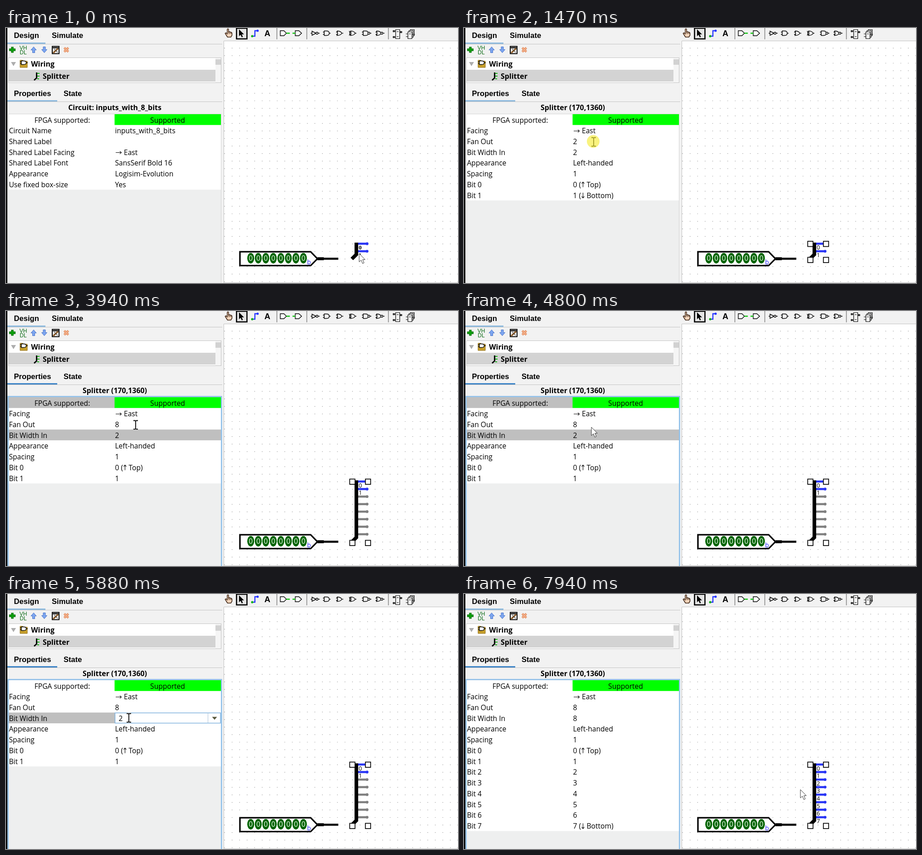
Recreate the animation shown at these times as an HTML page. Size 997 by 562 pixels, loop 8 s.

```html
<!DOCTYPE html>
<html lang="en">
<head>
<meta charset="utf-8">
<title>Splitter properties</title>
<style>
html, body { margin: 0; width: 100%; height: 100%; overflow: hidden; background: #f2f2f2; }
svg { display: block; width: 997px; height: 562px; }
text { font: 15.6px "Open Sans", "Noto Sans", sans-serif; white-space: pre; }
.b { font-weight: 700; font-size: 15.9px; }
.tab { font: bold 16.6px "Liberation Sans", Arial, sans-serif; }
.small { font: 12.5px "Open Sans", "Noto Sans", sans-serif; }
.early { font: bold 13px "Liberation Serif", serif; }
.vhdl { font: 12px "Liberation Sans", Arial, sans-serif; fill: #0a6a14; }
.mid { text-anchor: middle; }
.line { fill: none; stroke: #000; stroke-width: 1.4; }
</style>
</head>
<body>
<svg viewBox="0 0 997 562">
  <rect width="997" height="562" fill="#f2f2f2"/>

  <!-- tabs -->
  <path d="M3 35.5H477M3 162.5H477" stroke="#c4c4c4"/>
  <rect x="3" y="32" width="84" height="3" fill="#8fbbdf"/>
  <text class="tab" x="17.5" y="22">Design</text>
  <text class="tab" x="101" y="22">Simulate</text>
  <text class="tab" x="17.5" y="149.5">Properties</text>
  <text class="tab" x="127" y="149.5">State</text>

  <!-- explorer tools -->
  <path d="M14 41.5V54.5M7 48H21" stroke="#056a05" stroke-width="5.4"/>
  <path d="M14 42.5V53.5M8 48H20" stroke="#0aa30a" stroke-width="3.2"/>
  <text class="vhdl mid" x="38" y="47.5">VH</text>
  <text class="vhdl mid" x="38" y="58">DL</text>
  <g fill="#7da6f0" stroke="#4a74c8">
    <path d="M61 41.5L67 48.5H63.5V54.5H58.5V48.5H55Z"/>
    <path d="M84.5 54.5L90.5 47.5H87V41.5H82V47.5H78.5Z"/>
  </g>
  <rect x="102" y="40.5" width="15" height="16" fill="#fff" stroke="#000" stroke-width="2"/>
  <path d="M102 43.5H117" stroke="#333" stroke-width="3"/>
  <path d="M104 55L115 45" stroke="#8a5a28" stroke-width="3.5"/>
  <path d="M106 46L114 54" stroke="#555" stroke-width="1.5"/>
  <path d="M128.5 43.5L137.5 52.5M137.5 43.5L128.5 52.5" stroke="#df8858" stroke-width="4.6"/>
  <path d="M128.5 43.5L137.5 52.5M137.5 43.5L128.5 52.5" stroke="#f4b08c" stroke-width="2.4"/>

  <!-- explorer tree -->
  <rect x="5.5" y="65.5" width="469" height="55" fill="#fff" stroke="#c4c4c4"/>
  <rect x="6" y="92" width="456" height="26" fill="#d3d3d3"/>
  <rect x="462" y="66" width="12" height="54" fill="#f5f5f5"/>
  <rect x="462" y="69" width="12" height="12" fill="#d2d2d2"/>
  <path d="M11 75H22L16.5 84Z" fill="#adadad"/>
  <path d="M31 71H37L39 73H47V87H31Z" fill="#c8a02c" stroke="#8d6b12"/>
  <path d="M34 72.5H39Q44.5 72.5 44.5 76.500T39 80.5H34ZM31 74.5H34M31 78.5H34M44.5 76.5H48" fill="#fff" stroke="#000" stroke-width="1.3"/>
  <text class="b" x="55.2" y="85">Wiring</text>
  <path d="M67.5 98V110L62 115" fill="none" stroke="#000" stroke-width="3"/>
  <path d="M69 100H74M69 106H74M69 112H73" stroke="#18b418" stroke-width="2"/>
  <text class="b" x="81" y="111.5">Splitter</text>

  <!-- properties -->
  <rect x="5" y="189" width="469" height="373" fill="#eeefef"/>
  <g id="props"></g>

  <!-- canvas -->
  <rect x="480" y="28" width="517" height="534" fill="#fff"/>
  <path id="dots" fill="#7c7c7c"/>
  <path d="M480.5 562V28.5H997M480 561.5H997" fill="none" stroke="#c0c0c0"/>
  <path id="ring" d="M479.5 561V27H997" fill="none" stroke="#99c6ec" stroke-width="3"/>

  <!-- toolbar -->
  <path d="M597.5 0V25M663.5 0V25M843.5 0V25" stroke="#868686" stroke-width="1.6"/>
  <path d="M488 11V3Q489.5 1 491 3V9L493 8L495 9L497 9.5L498.5 11V16L496 20H488.5L483.5 12Q484 10 486 11L488 13Z" fill="#f3d5bb" stroke="#3a2010" stroke-width="1.5"/>
  <path d="M491.5 9V13M494 9.500V13M496.500 10V13" stroke="#3a2010"/>
  <rect x="508.5" y="0.5" width="23" height="23.5" fill="#e4e4e4" stroke="#000" stroke-width="2.6"/>
  <path d="M514 3V18L517.5 15L520 20.5L522.5 19.5L520 14H525Z"/>
  <path d="M543.5 18H549V6H554" fill="none" stroke="#2634ff" stroke-width="2.4"/>
  <circle cx="543" cy="18" r="2.5" fill="#13b313"/><circle cx="555" cy="6" r="2.5" fill="#2634ff"/>
  <text class="tab mid" x="576.5" y="18" style="font-size:18px">A</text>
  <g class="line" id="gates">
    <path d="M605 6H613L618.5 11.5L613 17H605ZM638 6H646L652 11.5L646 17H638Z" fill="#fff"/>
    <path d="M618.5 11.5H626M632 11.5H638" stroke="#13c313" stroke-width="2.4"/>
  </g>
  <g class="line" style="stroke-width:1.2">
    <path d="M859.5 3.5H868.5V23.5H859.5ZM854 7H859M854 20H859M868 9H873M862 8H866M862 19H866"/>
    <path d="M854 5.5H857V8.5H854ZM854 18.5H857V21.5H854ZM870 7.5H873V10.5H870Z"/>
    <path d="M886.5 8.5H895.5V23.5H886.5ZM889 8V5.5H898V20.5H896M892 5V3.5H900.5V17H898M882 13H886M882 19H886M896 14H902M889 13H893"/>
  </g>

  <!-- input pin -->
  <path d="M687 508.5H733" stroke="#000" stroke-width="4.6"/>
  <path d="M687 508.5H701" stroke="#000" stroke-width="6.5"/>
  <path d="M516 493.2H672L687 508.5L672 523.6H516Z" fill="#fff" stroke="#000" stroke-width="3.3"/>
  <g id="bits"></g>
  <text x="664" y="520.5" fill="#3a3aff" style="font:13.5px 'DejaVu Sans',sans-serif">b</text>

  <g id="splitter"></g>
  <rect width="3" height="562"/>
  <path id="arrow" d="M0 0V18.5L4.4 14.6L7.6 22L10.8 20.6L7.7 13.4H13Z" fill="#fff" stroke="#333" stroke-width="1"/>
  <g id="beam" fill="none">
    <path d="M-5 -9.5H-1.5L0 -8.5L1.5 -9.5H5M0 -8.5V8.5M-5 9.5H-1.5L0 8.5L1.5 9.5H5" stroke="#fff" stroke-width="3.4"/>
    <path d="M-5 -9.5H-1.5L0 -8.5L1.5 -9.5H5M0 -8.5V8.5M-5 9.5H-1.5L0 8.5L1.5 9.5H5" stroke="#000" stroke-width="1.8"/>
  </g>
  <circle id="click" r="14" fill="#f6ec3a" opacity=".65"/>
</svg>
<script>
const LOOP = 8000, ROW = 23.75, TOP = 190, GRID = 16.6;
const $ = id => document.getElementById(id);
const within = (t, a, b) => t >= a && t < b;
const rect = (x, y, w, h, fill, extra = '') =>
  `<rect x="${x}" y="${y}" width="${w}" height="${h}" fill="${fill}" ${extra}/>`;
const text = (x, y, s, cls = '', extra = '') =>
  `<text class="${cls}" x="${x}" y="${y}" ${extra}>${s}</text>`;
const range = n => [...Array(n).keys()];

function setup() {
  let d = '';
  for (let y = 43.7; y < 560; y += GRID)
    for (let x = 481.5; x < 997; x += GRID) d += `M${x.toFixed(1)} ${y.toFixed(1)}h1.2v1.2h-1.2z`;
  $('dots').setAttribute('d', d);

  $('bits').innerHTML = range(8).map(i => {
    const x = 539.8 + GRID * i;
    return `<ellipse cx="${x}" cy="507.3" rx="7.6" ry="11.6" fill="#006400"/>` +
      text(x, 513, '0', 'mid', `fill="#d8ecd8" style="font:15px 'DejaVu Sans',sans-serif"`);
  }).join('');

  const and = x => `<path d="M${x} 6.5h5q6 0 6 5t-6 5h-5zM${x - 3} 9h3m-3 5h3"/>`;
  const or = x => `<path d="M${x} 6.5q8 0 11 5q-3 5-11 5q3-5 0-10M${x - 2} 9h4m-4 5h4"/>`;
  const bubble = x => `<circle cx="${x}" cy="11.5" r="2.3" fill="#fff"/>`;
  const lead = x => `<path d="M${x} 11.5h4"/>`;
  $('gates').innerHTML += '<path d="M675 7V16L684 11.5ZM672 11.5H675"/>' + bubble(686) + lead(688) +
    and(702) + lead(712) + or(730) + lead(740) +
    or(759.5) + '<path d="M757 6.5q3 5 0 10"/>' + lead(769) +
    and(788) + bubble(800.5) + lead(802) + or(817) + bubble(829) + lead(831);
}

const CIRCUIT = [['Circuit Name', 'inputs_with_8_bits'], ['Shared Label', ''],
  ['Shared Label Facing', '→ East'], ['Shared Label Font', 'SansSerif Bold 16'],
  ['Appearance', 'Logisim-Evolution'], ['Use fixed box-size', 'Yes']];

function splitterRows(fan, width) {
  const side = i => i === 0 ? ' (↑ Top)' : i === fan - 1 ? ' (↓ Bottom)' : '';
  return [['Facing', '→ East'], ['Fan Out', fan], ['Bit Width In', width],
    ['Appearance', 'Left-handed'], ['Spacing', 1],
    ...range(width).map(i => ['Bit ' + i, i + side(i)])];
}

// Arrow glyphs are drawn so their width stays the same.
function value(y, s) {
  const [, pre, glyph, post] = String(s).match(/^([^→↑↓]*)([→↑↓]?) ?(.*)$/);
  const stroke = d => `<path class="line" style="stroke-width:1.1" d="${d}"/>`;
  if (!glyph) return text(240.5, y, s);
  if (glyph === '→')
    return stroke(`M242 ${y - 5}h12.5m-3.5 -3l3.5 3l-3.5 3`) + text(260, y, post);
  const tip = glyph === '↑' ? `M262.5 ${y}v-11.5m-3 3.5l3 -3.5l3 3.5`
    : `M262.5 ${y - 11.5}v11.5m-3 -3.5l3 3.5l3 -3.5`;
  return text(240.5, y, pre) + stroke(tip) + text(270.5, y, post);
}

function editor(row, s, caret, combo) {
  const y = TOP + ROW * row, x = s ? 256.5 : 248.5;
  return rect(6, y, 234, ROW, '#bfbfbf') + text(6.5, y + 18.3, combo ? 'Bit Width In' : 'Fan Out') +
    rect(240.5, y + .8, 232.5, 22.5, '#fff', 'stroke="#7fb2de" stroke-width="1.5"') +
    text(248.5, y + 18.3, s) +
    (caret ? rect(x - .5, y + 1.5, 1.2, 20.5, '#000') : '') +
    (combo ? rect(445, y + 1, 1, 22, '#a9c3da') + `<path d="M454.5 ${y + 9.5}h11l-5.5 6.5z" fill="#5a5a40"/>` : '');
}

function props(t) {
  const circuit = t < 130, fan = t < 3940 ? 2 : 8, width = t < 6610 ? 2 : 8;
  const rows = circuit ? CIRCUIT : splitterRows(fan, width);
  const focus = t >= 1530 && !within(t, 6610, 6670);
  const marked = within(t, 3940, 5130);
  const labels = rows.map(([k, v], i) => {
    const y = TOP + ROW * (i + 1) + 18.3;
    return text(6.5, y, k) + value(y, v);
  });
  let s = rect(3, 159, 110, 3, focus ? '#3f86c8' : '#8fbbdf') +
    text(240, 181, circuit ? 'Circuit: inputs_with_8_bits' : 'Splitter (170,1360)', 'b mid') +
    '<path d="M5.5 562V189.5H474.5V562" fill="none" stroke="#d4d4d4"/>' +
    rect(6, TOP, 468, ROW * (rows.length + 1), '#fff') +
    (marked ? rect(6, TOP, 234, ROW, '#bfbfbf') + rect(6, TOP + ROW * 3, 468, ROW, '#bfbfbf') : '') +
    rect(239.5, TOP, 234.5, ROW, '#00ff00') +
    text(124, TOP + 18.7, 'FPGA supported:', 'mid') + text(356.5, TOP + 18.7, 'Supported', 'mid') +
    labels.join('');
  if (within(t, 1530, 3940))
    s += editor(2, t < 2880 ? '2' : t < 3670 ? '' : '8', !within(t, 2000, 2470) && !within(t, 3410, 3670));
  if (within(t, 5200, 6610))
    s += editor(3, t < 6020 ? '2' : t < 6350 ? '' : '8', !within(t, 5880, 6020), true);
  if (focus) s += '<path d="M4.7 562V188.5H475.3V562" fill="none" stroke="#8fc0ea" stroke-width="2.6"/>';
  return s;
}

function splitter(t) {
  const picked = t >= 130, fan = t < 3940 ? 2 : 8, live = t < 6610 ? 2 : 8;
  const top = 492 - GRID * (fan - 1);
  const ends = range(fan).map(i => {
    const y = top + GRID * i, c = i < live ? '#2a36f5' : '#808080';
    return `<path d="M775 ${y}H797" stroke="${c}" stroke-width="4.6"/><circle cx="796.5" cy="${y}" r="3.1" fill="${c}"/>`;
  }).join('');
  const tags = range(live).map(i => text(778, top + GRID * i + 12.7, i, picked ? 'small' : 'early')).join('');
  const grip = (x, y) => rect(x - 5.8, y - 5.8, 11.6, 11.6, '#fff', 'stroke="#000" stroke-width="1.7"');
  return ends + `<path d="M772.8 ${top - 2.5}V499L762.8 509" fill="none" stroke="#000" stroke-width="8"/>` + tags +
    (picked ? [764, 798.5].map(x => grip(x, top + .4) + grip(x, 511.2)).join('') : '');
}

// time, x, y of the pointer
const PATH = [[0, 779, 497], [652, 779, 497], [720, 717, 466], [1060, 470, 343], [1332, 286, 251],
  [4732, 286, 251], [4800, 281, 256], [5070, 271, 273], [7136, 271, 273], [7200, 400, 313],
  [7330, 622, 382], [7532, 622, 382], [7940, 742, 431], [LOOP, 742, 431]];

function pointer(t) {
  const start = [7532, 7136, 4732, 652].find(a => t >= a) || 0;
  const step = start === 7136 ? 65 : 68;
  const q = start + Math.floor((t - start + .01) / step) * step;
  const i = Math.max(1, PATH.findIndex(p => p[0] > q));
  const [a, b] = [PATH[i - 1], PATH[i]], k = (q - a[0]) / (b[0] - a[0]);
  return [a[1] + (b[1] - a[1]) * k, a[2] + (b[2] - a[2]) * k];
}

const shown = {};
function put(id, html) {
  if (shown[id] !== html) $(id).innerHTML = shown[id] = html;
}
function show(id, on, x, y) {
  $(id).style.display = on ? '' : 'none';
  if (x !== undefined) $(id).setAttribute('transform', `translate(${x} ${y})`);
}

function draw(t) {
  put('props', props(t));
  put('splitter', splitter(t));
  show('ring', within(t, 130, 1470));
  const [x, y] = pointer(t);
  const beam = within(t, 1400, 3990) || within(t, 5200, 6610);
  show('click', within(t, 70, 320) || within(t, 1332, 1530) || within(t, 5130, 5400), x - 1, y - 1);
  show('beam', beam, x, y);
  show('arrow', !beam, x, y);
}

setup();
const begin = performance.now();
function tick() {
  draw((performance.now() - begin) % LOOP);
  requestAnimationFrame(tick);
}
draw(0);
requestAnimationFrame(tick);
</script>
</body>
</html>
```
